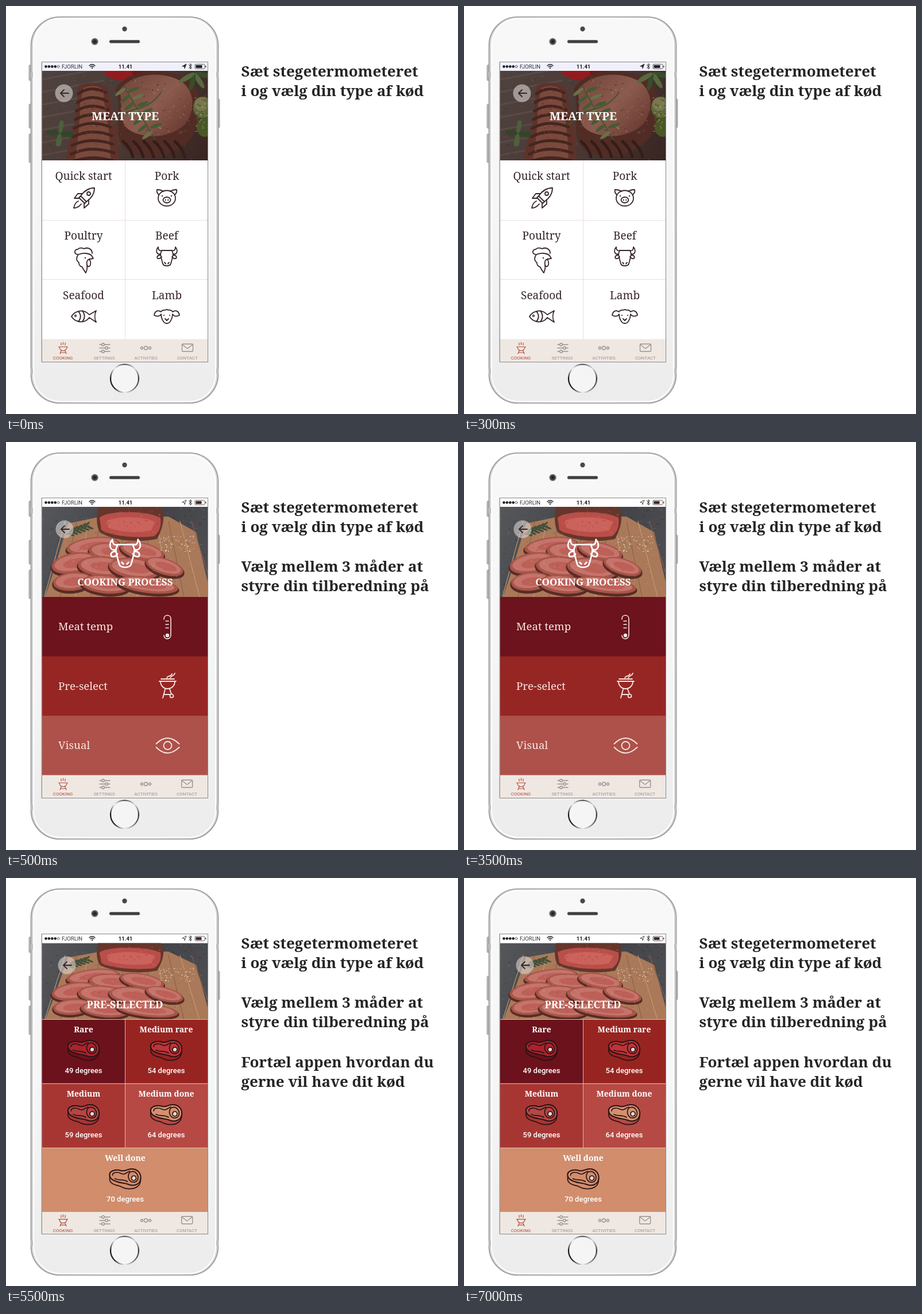
An HTML page with a canvas for the animation above (8000 ms loop, 787x711 px).

```html
<!DOCTYPE html>
<html lang="da">
<head>
<meta charset="utf-8">
<title>Stegetermometer</title>
<style>
html, body { margin: 0; width: 100%; height: 100%; overflow: hidden; background: #fff; }
canvas { display: block; width: 787px; height: 711px; }
</style>
</head>
<body>
<canvas id="stage" width="787" height="711"></canvas>
<script>
const ctx = document.getElementById('stage').getContext('2d');
const SERIF = '"Noto Serif", serif';
const SANS = 'Roboto, sans-serif';
const INK = '#35242a';
const LOOP = 8000;

function rect(x, y, w, h, color) {
  ctx.fillStyle = color;
  ctx.fillRect(x, y, w, h);
}

function rounded(x, y, w, h, r, fill, line, width = 1) {
  ctx.beginPath();
  ctx.roundRect(x, y, w, h, r);
  if (fill) { ctx.fillStyle = fill; ctx.fill(); }
  if (line) { ctx.strokeStyle = line; ctx.lineWidth = width; ctx.stroke(); }
}

function oval(x, y, rx, ry, fill, line, width = 1, turn = 0) {
  ctx.beginPath();
  ctx.ellipse(x, y, rx, ry, turn, 0, Math.PI * 2);
  if (fill) { ctx.fillStyle = fill; ctx.fill(); }
  if (line) { ctx.strokeStyle = line; ctx.lineWidth = width; ctx.stroke(); }
}

function draw(d, color, width) {
  ctx.strokeStyle = color;
  ctx.lineWidth = width;
  ctx.stroke(new Path2D(d));
}

function shape(d, color) {
  ctx.fillStyle = color;
  ctx.fill(new Path2D(d));
}

// Draws the part as given and once more flipped around x = 0.
function both(part) {
  part();
  ctx.save();
  ctx.scale(-1, 1);
  part();
  ctx.restore();
}

function at(x, y, scale, part) {
  ctx.save();
  ctx.translate(x, y);
  ctx.scale(scale, scale);
  part();
  ctx.restore();
}

function text(s, x, y, font, color, align = 'center') {
  ctx.font = font;
  ctx.fillStyle = color;
  ctx.textAlign = align;
  ctx.fillText(s, x, y);
}

function random(seed) {
  return () => (seed = (seed * 16807) % 2147483647) / 2147483647;
}

function specks(seed, count, x, y, w, h, colors, size) {
  const rnd = random(seed);
  for (let i = 0; i < count; i++) {
    const px = x + rnd() * w, py = y + rnd() * h;
    oval(px, py, size * (.4 + rnd()), size * (.3 + rnd() * .6), colors[i % colors.length]);
  }
}

function clipped(x, y, w, h, part) {
  ctx.save();
  ctx.beginPath();
  ctx.rect(x, y, w, h);
  ctx.clip();
  part();
  ctx.restore();
}

function fade(x0, y0, x1, y1, ...colors) {
  const g = ctx.createLinearGradient(x0, y0, x1, y1);
  colors.forEach((c, i) => g.addColorStop(i / (colors.length - 1), c));
  return g;
}

function phone() {
  rounded(40, 103, 5, 27, 1.5, '#b5b5b5', '#909090', .7);
  rounded(40, 171, 5, 42, 1.5, '#b5b5b5', '#909090', .7);
  rounded(40, 223, 5, 50, 1.5, '#b5b5b5', '#909090', .7);
  rounded(368, 162, 4, 50, 1.5, '#b5b5b5', '#909090', .7);
  rounded(43.5, 19, 326, 673, 50, fade(43, 0, 370, 0, '#d2d2d2', '#eee', '#eee', '#d2d2d2'), '#979797', 1.6);
  for (const y of [115, 632]) {
    rect(43, y, 6, 9, '#bdbdbd');
    rect(364, y, 6, 9, '#bdbdbd');
  }
  rounded(48, 22, 317, 667, 46, fade(0, 22, 0, 689, '#f8f8f8', '#f6f6f6', '#ececec'), '#fff', 2);
  oval(206.5, 40, 4.2, 4.2, '#48484a');
  oval(154.5, 62, 5.5, 5.5, '#3b3b40', '#86868a', 1.5);
  oval(154.5, 62, 2, 2, '#1c1c24');
  rounded(180, 59.5, 53, 5, 2.5, '#3f3f41', '#77777a', .8);

  const ring = ctx.createConicGradient(0, 206.5, 649);
  ['#333', '#777', '#eee', '#222', '#111', '#eee', '#444', '#ddd', '#333']
    .forEach((c, i) => ring.addColorStop(i / 8, c));
  oval(206.5, 649, 24.5, 24.5, '#f5f5f5', ring, 2.2);
}

function statusBar(first) {
  rect(63, 98, 289, 16, first ? '#f0f0fa' : '#fff');
  for (let i = 0; i < 5; i++) {
    oval(69.5 + i * 5.4, 105.5, 2, 2, i < 4 ? '#222' : null, '#222', .7);
  }
  text('FJORLIN', 97, 109, `9.5px ${SANS}`, '#333', 'left');
  draw('M145 104Q150 99.5 155 104M147 106Q150 103.5 153 106', '#222', 1.4);
  oval(150, 108, 1.2, 1.2, '#222');
  text('11.41', 208, 109, `bold 9.5px ${SANS}`, '#1d1d1f');
  const arrow = 'M307 105L314 101L311 109L310.5 105.5Z';
  if (first) shape(arrow, '#222');
  draw(arrow, '#222', .8);
  draw('M318.5 102.5L323.5 107.5L321 110V100.5L323.5 103L318.5 108', '#222', 1);
  rounded(329, 101.5, 17, 8, 1.5, null, '#555', .9);
  rect(330.5, 103, first ? 11 : 10, 5, first ? '#222' : '#4b2622');
  rect(347, 104, 1.5, 3, '#555');
}

function backButton(x) {
  oval(x, 152, 15.5, 15.5, 'rgba(222,216,214,.58)');
  draw(`M${x + 8} 152H${x - 6}M${x} 146L${x - 6} 152L${x} 158`, '#30282a', 1.8);
}

function leaf(x, y, turn, length, color) {
  oval(x + Math.cos(turn) * length / 2, y + Math.sin(turn) * length / 2, length / 2, length / 7, color, null, 1, turn);
}

function steakPhoto() {
  rect(63, 113, 289, 157, fade(63, 113, 352, 269, '#564946', '#51413d', '#3c2725'));
  for (let i = 0; i < 8; i++) draw(`M63 ${128 + i * 22}L170 ${108 + i * 22}`, 'rgba(125,112,107,.3)', 3);
  specks(17, 180, 63, 113, 289, 156, ['#67554f88', '#30222288', '#82716a66'], 1.3);
  oval(197, 116, 30, 13, '#a31e20', null, 1, .2);
  oval(236, 115, 17, 9, '#791b1c');
  shape('M126 139C149 129 177 134 180 151C184 179 196 205 196 269H105C105 240 119 218 121 192Z', '#67372f');
  shape('M135 143C151 136 171 140 170 153C170 179 181 201 182 266H120C127 225 129 194 129 169Z', '#895044');
  for (let i = 0; i < 9; i++) draw(`M${126 - i * 1.8} ${153 + i * 15}Q148 ${137 + i * 15} ${174 + i * 2} ${151 + i * 15}`, '#492923', 5);
  shape('M191 146C207 111 276 103 314 127C352 151 341 204 323 229C299 262 230 277 204 245C186 222 203 187 191 146Z', '#573029');
  shape('M197 148C222 112 280 115 306 132C334 153 326 190 311 207C279 236 224 230 207 209C195 188 205 172 197 148Z', fade(200, 120, 320, 230, '#7e4b41', '#9b6659', '#6c382f'));
  for (let i = 0; i < 6; i++) draw(`M${204 + i * 18} 236Q${217 + i * 18} 247 ${221 + i * 18} 263`, '#371f1b', 5);
  specks(53, 130, 200, 123, 125, 104, ['#ae796b88', '#56302b99', '#c2a09677'], 1.5);
  specks(91, 70, 125, 142, 55, 115, ['#b07b6877', '#43272088'], 1.3);
  draw('M207 141Q226 177 260 233M228 179Q198 186 184 207M228 179Q255 173 270 150', '#415d36', 1.8);
  for (let i = 0; i < 13; i++) {
    leaf(208 + i * 3.9, 143 + i * 6.3, i % 2 ? -.35 : 2.5, 22, i % 3 ? '#49663b' : '#708251');
  }
  for (let i = 0; i < 10; i++) leaf(94, 222, i * 1.6, 23, i % 2 ? '#536c44' : '#344e2c');
  for (let i = 0; i < 4; i++) leaf(328, 117, .2 + i * .8, 31, i % 2 ? '#617545' : '#3c562e');
  oval(343, 177, 17, 19, '#687442');
  oval(340, 171, 12, 12, '#858657');
  oval(346, 211, 14, 17, '#4f622c');
  specks(31, 50, 330, 155, 20, 65, ['#a4a072', '#46592a'], 1.6);
  rect(63, 113, 289, 157, 'rgba(35,18,15,.13)');
}

function slice(x, y, rx, ry, turn) {
  oval(x, y + 3, rx + 2, ry + 2, '#582c25', null, 1, turn);
  oval(x, y, rx, ry, '#a75549', null, 1, turn);
  oval(x, y - 1, rx * .88, ry * .78, '#c5746b', null, 1, turn);
  oval(x + 3, y, rx * .57, ry * .45, '#bc6058', null, 1, turn);
}

function roastPhoto() {
  rect(63, 113, 289, 164, fade(63, 113, 352, 270, '#55575a', '#414246', '#505055'));
  specks(77, 240, 63, 113, 289, 157, ['#77777a66', '#26282b77'], 1.7);
  shape('M108 142L165 130H283L331 157L351 244V270H68L82 228Z', '#aa7959');
  for (let i = 0; i < 12; i++) draw(`M${103 + i * 20} 138L${67 + i * 27} 270`, i % 2 ? '#8a5e45' : '#c49a77', 1.1);
  specks(141, 120, 85, 158, 245, 105, ['#74472c77', '#d0a18377'], 1.3);
  shape('M160 113H269C280 130 271 154 263 169C225 177 182 170 163 157C156 143 158 125 160 113Z', '#65362c');
  shape('M163 132C175 119 246 119 269 132C271 147 266 158 258 164C220 169 178 162 166 153Z', '#ba4e49');
  shape('M176 137C200 127 243 131 259 139L253 154C225 160 194 156 178 149Z', '#cb625c');
  specks(201, 95, 164, 114, 105, 48, ['#da887d66', '#80392f77'], 1.2);
  for (const [x, y, rx, ry, turn] of [
    [151, 181, 46, 15, -.13], [187, 191, 43, 16, .07], [237, 190, 39, 15, .22],
    [119, 211, 40, 18, -.18], [169, 217, 44, 18, .08], [224, 220, 45, 18, .13],
    [276, 217, 34, 14, .3], [116, 243, 34, 16, -.1], [173, 248, 43, 16, .1], [246, 249, 54, 14, .13]
  ]) slice(x, y, rx, ry, turn);
  specks(319, 190, 86, 173, 217, 83, ['#e2a19c77', '#8b4c4077', '#d6847b77'], 1.2);
  draw('M105 161Q125 153 145 146', '#334030', 1.5);
  for (let i = 0; i < 11; i++) leaf(107 + i * 3.3, 159 - i * 1.2, i % 2 ? -.8 : .35, 13, '#3e503a');
  specks(41, 60, 268, 164, 62, 27, ['#ded2c5', '#eee7df'], 1);
}

function cow(color, width) {
  draw('M-9 -11H9L11 -5C10 3 8 8 7 12C6 17 -6 17 -7 12C-8 8 -10 3 -11 -5Z', color, width);
  both(() => draw('M-11 -5C-18 -3 -20 -11 -15 -17C-15 -11 -12 -10 -9 -11M-11 -3C-16 -3 -18 0 -16 3C-13 4 -10 2 -9 0M-4 10L-2 12', color, width));
}

function meatIcons() {
  const w = 1.8;
  draw('M154 317C145 317 137 321 130 331L140 341C150 334 154 326 154 317ZM130 331L127 334L137 344L140 341M133 327H125L119 335H128M144 337V345L136 352V344M126 340C121 342 119 347 118 352C124 352 128 349 131 345', INK, w);
  oval(144, 327, 3, 3, null, INK, w);

  at(280, 334, 1, () => {
    oval(0, 1, 15, 13.5, null, INK, w);
    both(() => {
      draw('M-14 -5C-17 -8 -18 -11 -17 -14C-13 -14 -9 -13 -6 -11', INK, w);
      oval(-8, -3, 1.2, 1.2, INK);
      oval(-2.3, 4, 1, 1.6, INK);
    });
    oval(0, 4, 6.5, 5, null, INK, w);
  });

  draw('M126 433C118 433 118 424 125 424C128 420 134 422 136 423C142 420 150 423 150 431M126 433C134 430 144 430 149 435L152 440L145 441M126 433C122 438 122 444 127 447C126 450 129 454 133 455C134 459 137 462 139 465C141 460 142 456 141 452', INK, w);
  oval(144, 448, 3.3, 6, null, INK, w);
  oval(138, 439, 1.2, 1.2, INK);

  at(280, 437, 1, () => cow(INK, w));

  draw('M114 541C120 531 135 527 145 538L157 531C154 537 154 545 157 551L145 543C136 555 120 551 114 541ZM126 532C131 538 131 544 126 550M133 531C138 538 138 544 133 550', INK, w);
  oval(121, 540, 1.5, 1.5, null, INK, 1.3);

  at(280, 541, 1, () => both(() => {
    draw('M0 -12C-4 -10 -8 -13 -10 -8C-16 -12 -21 -9 -22 -2C-16 1 -12 -1 -10 -4C-10 4 -5 13 0 12M-3 4L0 7', INK, w);
    oval(-5, -2, 1.1, 1.1, INK);
  }));
}

function meatScreen() {
  clipped(63, 113, 289, 157, steakPhoto);
  backButton(101);
  text('MEAT TYPE', 207.5, 199, `bold 20px ${SERIF}`, '#fff');
  rect(63, 269, 289, 312, '#fff');
  rect(207, 269, 1, 312, '#eadfdf');
  rect(63, 373, 289, 1, '#eadfdf');
  rect(63, 476, 289, 1, '#eadfdf');
  ['Quick start', 'Pork', 'Poultry', 'Beef', 'Seafood', 'Lamb'].forEach((name, i) =>
    text(name, i % 2 ? 280 : 135, 303 + (i >> 1) * 104, `19px ${SERIF}`, INK));
  meatIcons();
}

function processScreen() {
  const pale = '#f8e7e2';
  clipped(63, 113, 289, 158, roastPhoto);
  backButton(102);
  at(207.5, 195, 1.48, () => cow('#fff', 1.8));
  text('COOKING PROCESS', 207.5, 250, `bold 17px ${SERIF}`, '#fff');
  const rows = [['Meat temp', '#6c131d'], ['Pre-select', '#962624'], ['Visual', '#ad514a']];
  rows.forEach(([name, color], i) => {
    const y = 270 + i * 103.5;
    rect(63, y, 289, 104, color);
    text(name, 91, y + 58, `18.7px ${SERIF}`, pale, 'left');
  });
  draw('M275 309V308C275 300 287 300 287 308V336C287 345 275 345 275 337M278 312H283M278 318H283M278 324H283', pale, 1.6);
  oval(281, 337, 3.2, 3.2, pale);
  draw('M270 413H293M267 417H296M269 417C269 425 275 430 281 430C288 430 294 425 294 417M277 431L273 446M285 431L288 439M275 440H286M280 411C282 406 287 410 289 404M286 411C288 406 292 409 294 403', pale, 1.8);
  oval(288.5, 442.5, 3, 3, null, pale, 1.7);
  draw('M261.5 526Q281 506 301.5 526M261.5 532Q281 552 301.5 532', pale, 1.8);
  oval(281.5, 529, 7, 7, null, pale, 1.8);
}

function steak(x, y, color) {
  at(x, y, 1, () => {
    const line = '#291214';
    const outline = 'M-27 -5C-29 -14 -16 -17 -7 -14C0 -12 3 -17 11 -17C22 -17 28 -9 27 0C26 10 15 14 6 10C-2 7 -8 8 -15 5C-22 3 -26 0 -27 -5Z';
    shape(outline, color);
    draw(outline, line, 2);
    draw('M-27 -4V2C-25 10 -16 11 -9 13C-1 18 12 20 21 14C26 11 27 6 27 0M-22 -6C-22 -12 -12 -12 -7 -9C0 -6 2 -11 8 -13M10 -12C18 -15 24 -6 22 1C20 7 12 8 8 3C4 -2 5 -10 10 -12ZM-18 0C-9 4 -4 0 4 5', line, 1.7);
    oval(15, -1, 4, 4, '#e9d8d0', line, 1.7);
  });
}

function doneScreen() {
  clipped(63, 113, 289, 135, () => {
    ctx.translate(0, 17);
    ctx.scale(1, .855);
    roastPhoto();
  });
  backButton(106);
  text('PRE-SELECTED', 207, 227, `bold 17.5px ${SERIF}`, '#fff');
  const cells = [
    ['Rare', 49, '#6c121c', '#a8232d'], ['Medium rare', 54, '#982421', '#bd3438'],
    ['Medium', 59, '#a73633', '#b54643'], ['Medium done', 64, '#b64944', '#d4906f'],
    ['Well done', 70, '#d18d6c', '#d18d6c']
  ];
  rect(63, 246, 289, 336, '#e1b6a9');
  cells.forEach(([name, degrees, fill, meat], i) => {
    const wide = i === 4, right = i % 2;
    const y = 247 + (i >> 1) * 112;
    const x = wide ? 207.5 : right ? 279 : 135;
    rect(right ? 208 : 63, y, wide ? 289 : 144, 110.8, fill);
    text(name, x, y + 21.5, `bold 14px ${SERIF}`, '#fff');
    steak(x, y + 53, meat);
    text(`${degrees} degrees`, x, y + 93, `500 13px ${SANS}`, '#fff');
  });
}

function tabs(scene) {
  const gray = '#99918f', red = '#b64a3d';
  const dx = scene ? -.8 : 0;
  rect(63, scene === 2 ? 582 : 580.5, 289, 40, '#efe8e2');
  ctx.save();
  ctx.translate(0, scene === 2 ? .7 : 0);
  draw('M91.5 594H107.5M93 594C93 603 106 603 106 594M96 601L94 606M103 601L105 606M95 604H104M96 587V591M99.5 586V590M103 587V591', red, 1.2);
  [[590, 169], [596, 175], [602, 169]].forEach(([y, x]) => {
    draw(`M163 ${y}H181`, gray, 1.5);
    oval(x, y, 2.3, 2.3, '#efe8e2', gray, 1.4);
  });
  [[236.5, 2], [243.5, 3], [250.5, 2]].forEach(([x, r]) => oval(x, 596, r, r, null, gray, 1.4));
  rounded(306.5 + dx, 589, 19, 13, 1.5, null, gray, 1.4);
  draw(`M${307 + dx} 590L${316 + dx} 597L${325 + dx} 590`, gray, 1.3);
  ['COOKING', 'SETTINGS', 'ACTIVITIES', 'CONTACT'].forEach((name, i) =>
    text(name, [99, 171, 243.5, 315.8 + dx][i], 616.3, `8px ${SANS}`, i ? gray : red));
  ctx.restore();
}

const screens = [meatScreen, processScreen, doneScreen];
const steps = [
  ['Sæt stegetermometeret', 'i og vælg din type af kød'],
  ['Vælg mellem 3 måder at', 'styre din tilberedning på'],
  ['Fortæl appen hvordan du', 'gerne vil have dit kød']
];

function render(scene) {
  rect(0, 0, 787, 711, '#fff');
  ctx.lineCap = ctx.lineJoin = 'round';
  phone();
  rect(62, 97, 290, 524, '#aaa');
  statusBar(scene === 0);
  clipped(63, 113, 288.5, 507, () => {
    screens[scene]();
    tabs(scene);
  });
  rounded(62.5, 97.5, 289, 523, 0, null, '#8c8788', 1);
  steps.slice(0, scene + 1).forEach((lines, i) => lines.forEach((line, j) =>
    text(line, 409.5, 123 + i * 103.3 + j * 34, `bold 26px ${SERIF}`, '#252527', 'left')));
}

function tick() {
  const time = performance.now() % LOOP;
  render(time < 500 ? 0 : time < 5500 ? 1 : 2);
  requestAnimationFrame(tick);
}
tick();
</script>
</body>
</html>
```
